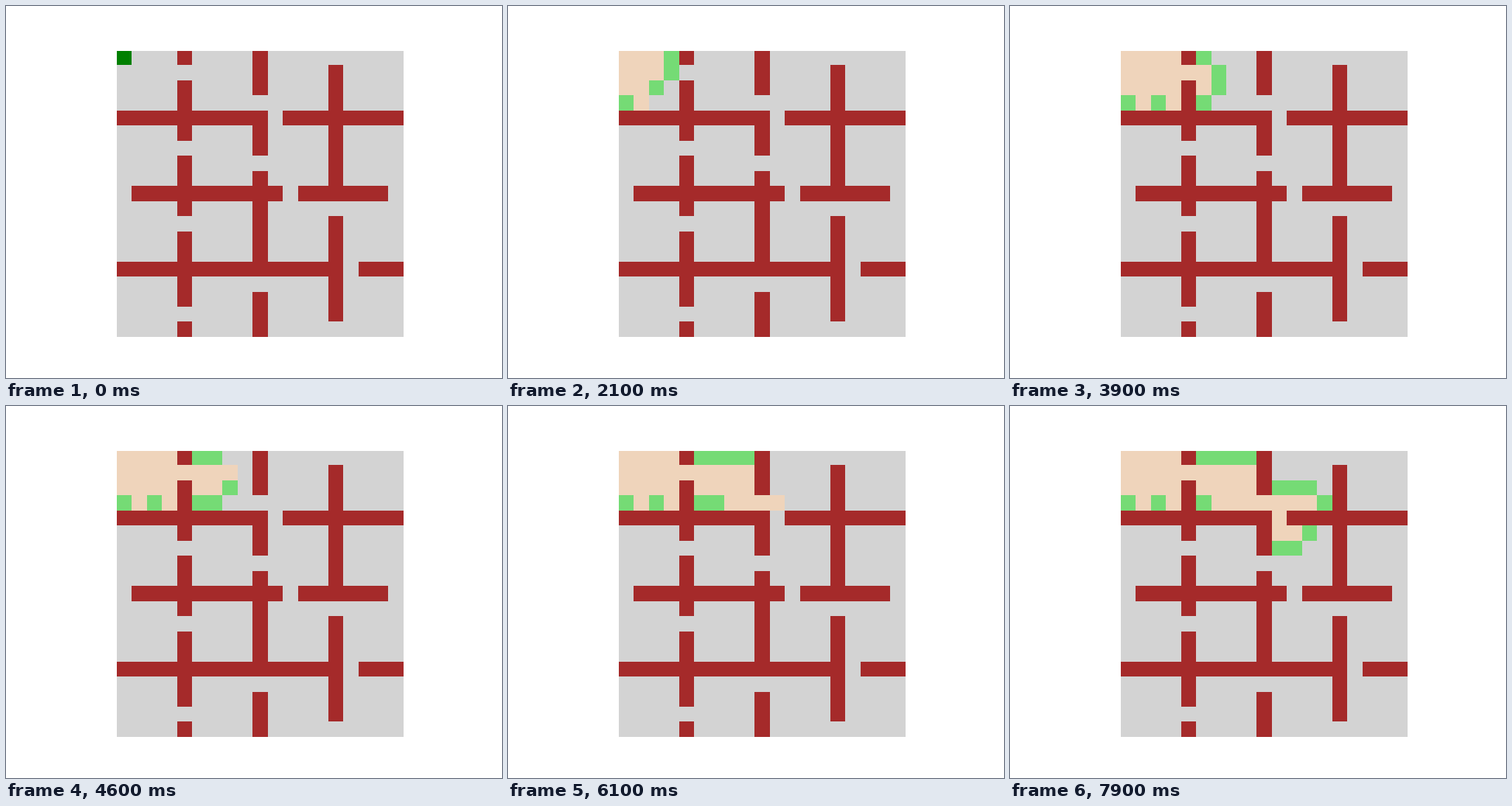
Write a matplotlib script that moves like this. It is 640 px wide and 480 px high and loops after 8000 ms.

```python
import numpy as np
import matplotlib.pyplot as plt
from matplotlib.animation import FuncAnimation
from matplotlib.colors import ListedColormap

SIZE, FRAMES, INTERVAL = 19, 80, 100
FREE, WALL, START, OPEN, CLOSED = range(5)
COLORS = ["lightgray", "brown", "green", "#75DB75", "#EFD4BB"]
STEPS = [(1, 0), (-1, 0), (0, 1), (0, -1)]
GOAL = (SIZE - 1, SIZE - 1)

# Walls stand on every fifth row and column, broken by doors.
ROW_DOORS = {4: [10], 9: [0, 11, 18], 14: [15]}
COL_DOORS = {4: [1, 6, 11, 17], 9: [3, 7, 15], 14: [0, 10, 18]}


def build_maze():
    maze = np.full((SIZE, SIZE), FREE)
    for row in ROW_DOORS:
        maze[row] = WALL
    for col in COL_DOORS:
        maze[:, col] = WALL
    for row, doors in ROW_DOORS.items():
        maze[row, doors] = FREE
    for col, doors in COL_DOORS.items():
        maze[doors, col] = FREE
    return maze


def sift_up(heap, pos):
    item = heap[pos]
    while pos > 0 and item[0] < heap[(pos - 1) // 2][0]:
        heap[pos] = heap[(pos - 1) // 2]
        pos = (pos - 1) // 2
    heap[pos] = item


def push(heap, item):
    heap.append(item)
    sift_up(heap, len(heap) - 1)


def pop(heap):
    last = heap.pop()
    if not heap:
        return last
    top, pos, child = heap[0], 0, 1
    # Move the smaller child up to a leaf; ties take the right one.
    while child < len(heap):
        if child + 1 < len(heap) and not heap[child][0] < heap[child + 1][0]:
            child += 1
        heap[pos] = heap[child]
        pos, child = child, 2 * child + 1
    heap[pos] = last
    sift_up(heap, pos)
    return top


def search(maze):
    """A* from the top left corner, yielding each change of a cell."""
    heap, opened, closed = [(0, 0, (0, 0))], {(0, 0)}, set()
    while heap:
        _, cost, cell = pop(heap)
        if cell not in closed:
            closed.add(cell)
            yield cell, CLOSED
        if cell == GOAL:
            return
        for dr, dc in STEPS:
            r, c = cell[0] + dr, cell[1] + dc
            if not (0 <= r < SIZE and 0 <= c < SIZE):
                continue
            if maze[r, c] == WALL or (r, c) in closed:
                continue
            rest = abs(GOAL[0] - r) + abs(GOAL[1] - c)
            push(heap, (cost + 1 + rest, cost + 1, (r, c)))
            if (r, c) not in opened:
                opened.add((r, c))
                yield (r, c), OPEN


def build_states():
    maze = build_maze()
    grid = maze.copy()
    grid[0, 0] = START
    states = [grid]
    for (cell, kind), _ in zip(search(maze), range(FRAMES - 1)):
        grid = grid.copy()
        grid[cell] = kind
        states.append(grid)
    return states


states = build_states()
fig, ax = plt.subplots(figsize=(6.4, 4.8), dpi=100)
ax.axis("off")
image = ax.imshow(states[0], cmap=ListedColormap(COLORS), vmin=-0.5,
                  vmax=len(COLORS) - 0.5, interpolation="nearest")


def draw(i):
    image.set_data(states[i])
    return [image]


anim = FuncAnimation(fig, draw, frames=FRAMES, interval=INTERVAL,
                     repeat=True, repeat_delay=0)
plt.show()
```
